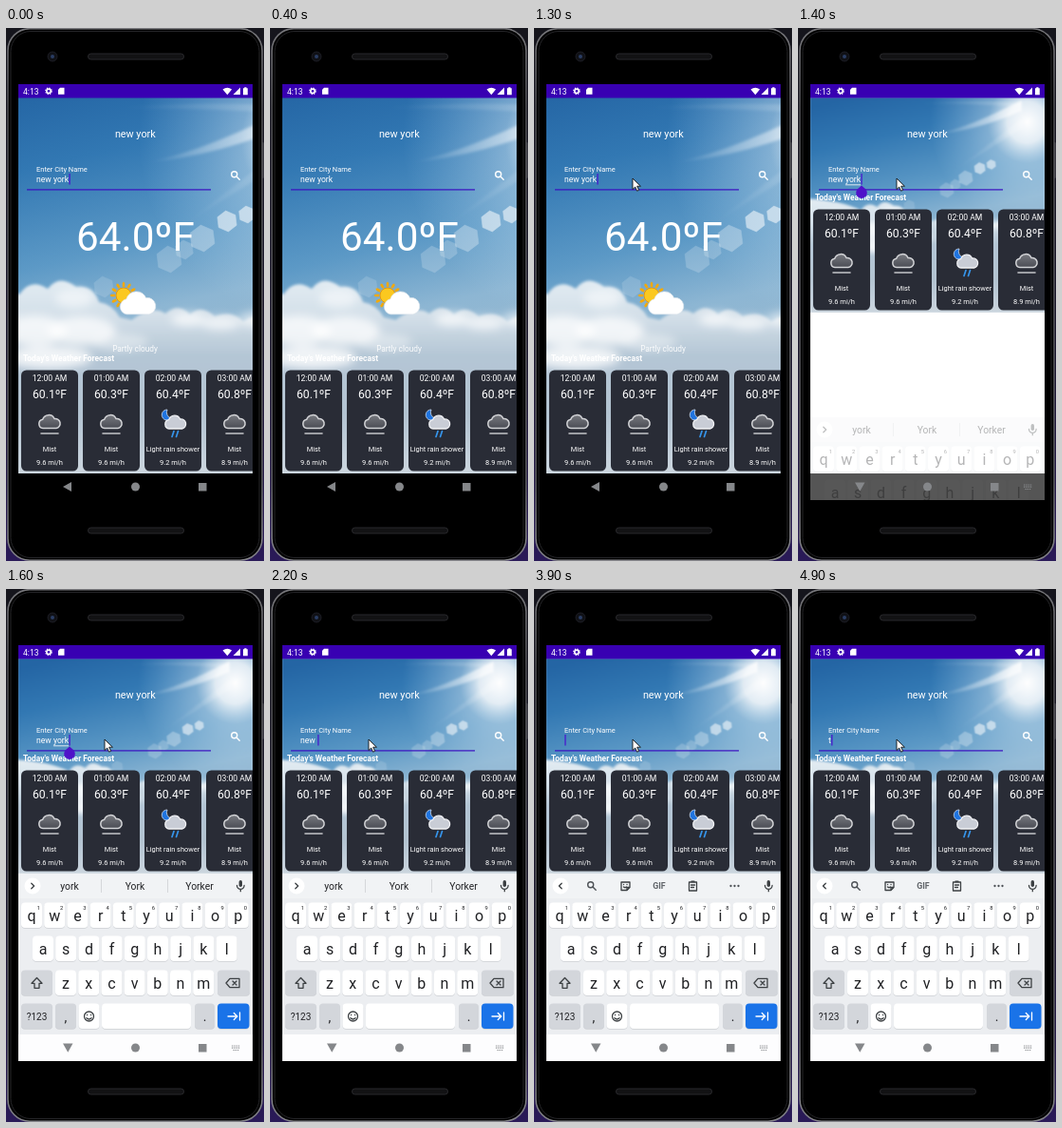
An HTML page that plays this animation: 272x560 px, repeating every 5 s.

```html
<!DOCTYPE html>
<html lang="en">
<head>
<meta charset="utf-8">
<title>Weather app</title>
<style>
html, body { margin: 0; width: 100%; height: 100%; overflow: hidden; background: #08080f; }
svg { display: block; width: 272px; height: 560px; }
text { font-family: Roboto, "Noto Sans", sans-serif; fill: #fff; white-space: pre; }
.mid { text-anchor: middle; }
.dark, .dark text { fill: #202124; }
.line { fill: none; stroke: #3c4043; stroke-width: 1.3; stroke-linecap: round; stroke-linejoin: round; }

.wide, .sky, .forecast, .open, .kb, .navbar, .words, .tools, .handle, .caret {
  animation: 5s step-end infinite;
}
.wide { animation-name: wide; }
.open { animation-name: open; }
.sky { animation-name: sky; transform-origin: 136.5px 73px; }
.forecast { animation-name: forecast; }
.kb { animation-name: kb; }
.navbar { animation-name: navbar; }
.words { animation-name: words; }
.tools { animation-name: tools; }
.handle { animation-name: handle; }
.caret { animation-name: caret; }
.pointer { animation: pointer 5s linear infinite; }

@keyframes wide { 0% { opacity: 1 } 27.9%, 100% { opacity: 0 } }
@keyframes open { 0% { opacity: 0 } 27.9%, 100% { opacity: 1 } }
@keyframes sky { 0% { transform: none } 27.9%, 100% { transform: scale(.572) } }
@keyframes forecast { 0% { transform: none } 27.9%, 100% { transform: translateY(-169px) } }
@keyframes kb {
  0% { opacity: 0; transform: translateY(176px) }
  27.9% { opacity: .33; transform: translateY(110px) }
  29.9% { opacity: .82; transform: translateY(24px) }
  31.9%, 100% { opacity: 1; transform: none }
}
@keyframes navbar { 0% { opacity: 1 } 27.9% { opacity: .66 } 29.9% { opacity: .2 } 31.9%, 100% { opacity: 0 } }
@keyframes words { 0% { opacity: 1 } 51.9%, 100% { opacity: 0 } }
@keyframes tools { 0% { opacity: 0 } 51.9%, 100% { opacity: 1 } }
@keyframes handle { 0% { opacity: 0 } 27.9% { opacity: 1 } 37.9%, 100% { opacity: 0 } }
@keyframes caret {
  0% { opacity: 1 } 7.9% { opacity: 0 } 17.9% { opacity: 1 }
  61.9% { opacity: 0 } 71.9% { opacity: 1 }
  81.9% { opacity: 0 } 91.9%, 100% { opacity: 1 }
}
@keyframes pointer {
  0%, 17% { transform: translate(62px, 562px); animation-timing-function: ease-out }
  25%, 100% { transform: translate(104px, 158px) }
}
</style>
</head>
<body>
<svg viewBox="0 0 272 560" xmlns="http://www.w3.org/2000/svg">
  <defs>
    <linearGradient id="skyFill" x1=".15" y1="0" x2=".4" y2="1">
      <stop offset="0" stop-color="#2465a4"/>
      <stop offset=".2" stop-color="#3278b3"/>
      <stop offset=".45" stop-color="#5c99c6"/>
      <stop offset=".62" stop-color="#8db6d3"/>
      <stop offset="1" stop-color="#a9bccd"/>
    </linearGradient>
    <radialGradient id="glow">
      <stop offset="0" stop-color="#fff"/>
      <stop offset=".2" stop-color="#fff" stop-opacity=".85"/>
      <stop offset=".4" stop-color="#dcecf6" stop-opacity=".42"/>
      <stop offset="1" stop-color="#b5d8f0" stop-opacity="0"/>
    </radialGradient>
    <linearGradient id="ray">
      <stop offset="0" stop-color="#fff" stop-opacity="0"/>
      <stop offset="1" stop-color="#fff" stop-opacity=".75"/>
    </linearGradient>
    <linearGradient id="bank" gradientUnits="userSpaceOnUse" x1="0" y1="262" x2="0" y2="468">
      <stop offset="0" stop-color="#e3ecf3"/>
      <stop offset=".2" stop-color="#d3dfe8"/>
      <stop offset=".4" stop-color="#b4c6d5"/>
      <stop offset=".7" stop-color="#b3c3d1"/>
      <stop offset="1" stop-color="#ccd6df"/>
    </linearGradient>
    <linearGradient id="edge" x2="0" y2="1">
      <stop offset="0" stop-color="#15151c"/>
      <stop offset=".6" stop-color="#17132a"/>
      <stop offset="1" stop-color="#2a1a58"/>
    </linearGradient>
    <linearGradient id="metal" x2="0" y2="1">
      <stop offset="0" stop-color="#77777b"/>
      <stop offset=".15" stop-color="#4c4c50"/>
      <stop offset=".85" stop-color="#5a5a5f"/>
      <stop offset="1" stop-color="#85858a"/>
    </linearGradient>
    <linearGradient id="cloudFill" x2="0" y2="1">
      <stop offset="0" stop-color="#76787e"/>
      <stop offset="1" stop-color="#4b4d55"/>
    </linearGradient>
    <filter id="soft" x="-40%" y="-40%" width="180%" height="180%"><feGaussianBlur stdDeviation="5"/></filter>
    <filter id="fine" x="-40%" y="-40%" width="180%" height="180%"><feGaussianBlur stdDeviation="1.800"/></filter>
    <clipPath id="screen"><rect x="13" y="59" width="247" height="437"/></clipPath>
    <clipPath id="skyBox"><rect x="-80" y="73" width="433" height="395"/></clipPath>
    <path id="puff" d="M5 15a4.7 4.7 0 0 1-.3-9.3A6.6 6.6 0 0 1 17 5a5 5 0 0 1 2 10z"/>
    <g id="lens" fill="none" stroke-width="1.4"><circle cx="-1.3" cy="-1.3" r="3"/><path d="M1 1 4.2 4.2" stroke-linecap="round"/></g>
  </defs>

  <!-- phone body -->
  <rect width="272" height="560" fill="url(#edge)"/>
  <rect x="269" y="120" width="2.500" height="38" rx="1" fill="#55555a"/>
  <rect x="2" y=".7" width="268" height="558.500" rx="23" fill="#000" stroke="url(#metal)" stroke-width="1.600"/>
  <rect x="5" y="3.500" width="262" height="553" rx="21" fill="none" stroke="#242427"/>
  <g fill="#121214" stroke="#29292c">
    <rect x="86.500" y="27" width="101" height="6" rx="3"/>
    <rect x="86.500" y="525" width="101" height="6" rx="3"/>
  </g>
  <circle cx="49" cy="30" r="5" fill="#101116" stroke="#1c1d23"/>
  <circle cx="49" cy="30" r="2" fill="#2a3d63"/>

  <g clip-path="url(#screen)">
    <rect x="13" y="73" width="247" height="423" fill="#fff"/>
    <g class="sky"><g clip-path="url(#skyBox)">
      <rect x="-80" y="73" width="433" height="395" fill="url(#skyFill)"/>
      <ellipse cx="320" cy="118" rx="180" ry="190" fill="url(#glow)"/>
      <g fill="url(#ray)" filter="url(#fine)">
        <path d="M150 141Q215 128 310 78V98Q225 134 150 141z"/>
        <path d="M120 84Q210 76 310 82V90Q210 84 120 84z" opacity=".3"/>
        <path d="M190 205L310 112V130z" opacity=".3"/>
      </g>
      <g fill="url(#bank)" filter="url(#fine)">
        <path d="M120 480V318Q150 288 168 300Q182 288 194 301Q206 290 220 303Q238 296 250 308Q290 288 360 300V480z"/>
        <path d="M-90 480V258Q-20 262 14 280Q26 262 44 274Q56 258 74 272Q92 270 98 288Q112 290 120 304Q145 308 160 322L260 340V480z"/>
      </g>
      <g id="clouds" fill="#fff" filter="url(#soft)"></g>
      <g id="flares" fill="#fff" stroke="#fff" stroke-opacity=".6"></g>
    </g></g>

    <!-- status bar -->
    <rect x="13" y="59" width="247" height="14.500" fill="#3800b2"/>
    <text x="18" y="69.500" font-size="8.600">4:13</text>
    <circle cx="45" cy="66.300" r="2.200" fill="none" stroke="#fff" stroke-width="1.600"/>
    <circle cx="45" cy="66.300" r="3.300" fill="none" stroke="#fff" stroke-width="1.100" stroke-dasharray="1.3 1.290"/>
    <path d="M57 62.800h4.500v7h-6.500v-5z" fill="#fff"/>
    <path d="M228.500 64.500q4.800-3.600 9.600 0l-4.800 5.700zM247 62.500v7.500h-7.500zM250 63.200h1.300v-.9h2.200v.9h1.300v7h-4.800z" fill="#fff"/>

    <!-- search header -->
    <text class="mid" x="136.300" y="115" font-size="10.800">new york</text>
    <text x="32" y="151.300" font-size="7.500">Enter City Name</text>
    <text id="query" x="32" y="162.400" font-size="8.600"></text>
    <path id="compose" stroke="#fff" stroke-width=".8"/>
    <rect x="22" y="169.300" width="194" height="1.200" fill="#3a0fc0"/>
    <rect id="caret" class="caret" y="153" width="1.200" height="11.500" fill="#4a10d0"/>
    <use href="#lens" x="242" y="155" stroke="#fff"/>

    <!-- current conditions -->
    <g class="wide">
      <text class="mid" x="136.500" y="234" font-size="42.200">64.0ºF</text>
      <g id="sun" fill="#f2a90c"></g>
      <use href="#puff" transform="translate(119 275) scale(1.68 1.72)" fill="#fff" stroke="#dfe6ec" stroke-width=".4"/>
      <text class="mid" x="136" y="340" font-size="8.300" opacity=".92">Partly cloudy</text>
    </g>

    <g class="forecast">
      <text x="18" y="350" font-size="8.400" font-weight="700">Today's Weather Forecast</text>
      <g id="cards"></g>
    </g>

    <g class="handle">
      <path d="M67 165.500l4.300 3.800a5.800 5.800 0 1 1-8.600 0z" fill="#4f12c9"/>
    </g>

    <!-- keyboard -->
    <g class="kb">
      <rect x="13" y="299" width="247" height="200" fill="#eceef1"/>
      <rect x="13" y="299" width="247" height="26" fill="#f1f3f5"/>
      <g id="keys"></g>
      <circle cx="28" cy="312" r="8.500" fill="#fff"/>
      <g class="words">
        <path class="line" d="M26.800 309.200l2.800 2.800-2.800 2.800"/>
        <path d="M100.500 305v14M170.500 305v14" stroke="#d5d7da"/>
        <g class="mid dark" font-size="10.300">
          <text x="67" y="315.500">york</text><text x="136" y="315.500">York</text><text x="204" y="315.500">Yorker</text>
        </g>
      </g>
      <g class="tools">
        <path class="line" d="M29.200 309.200l-2.800 2.800 2.800 2.800"/>
        <use href="#lens" x="61" y="312" stroke="#4d5156"/>
        <path class="line" d="M92 308h9v5.500l-3 3h-6zM98 316v-2.500h3M94.500 310.500h.1M98 310.500h.1M94.500 313q1.500 1.300 3 0"/>
        <text class="mid" x="132" y="315.300" font-size="8.800" font-weight="700" style="fill:#5f6368">GIF</text>
        <path class="line" d="M163.500 308h8v9h-8zM166 307.200h3M165.500 311h4M165.500 313.500h3"/>
        <g fill="#4d5156"><circle cx="207.500" cy="312" r="1.150"/><circle cx="211.500" cy="312" r="1.150"/><circle cx="215.500" cy="312" r="1.150"/></g>
      </g>
      <rect x="245.600" y="306" width="3.400" height="7" rx="1.700" fill="#3c4043"/>
      <path class="line" d="M243.500 311.500a3.800 3.800 0 0 0 7.600 0M247.300 315.500v2.200"/>
      <rect x="13" y="468" width="247" height="31" fill="#fdfdfe"/>
    </g>

    <!-- navigation -->
    <rect class="navbar" x="13" y="468" width="247" height="28" fill="#000"/>
    <g fill="#85878a">
      <path class="wide" d="M60 482l9-5v10z"/>
      <path class="open" d="M60 477.500h10.500l-5.250 9.300z"/>
      <circle cx="136.500" cy="482" r="4.500"/>
      <rect x="203" y="478" width="8.500" height="8.500"/>
    </g>
    <g class="open" stroke="#8b8d90" stroke-width="1.200" stroke-dasharray="1.300 .9">
      <path d="M238 480h9M238 482.200h9M239.500 484.500h6"/>
    </g>
  </g>

  <g class="pointer">
    <path d="M0 0v11.500l2.700-2.500 1.900 4.200 2-.9-1.900-4.100h3.700z" fill="#fff" stroke="#111" stroke-width=".9"/>
  </g>
</svg>

<script>
const $ = id => document.getElementById(id);
const rect = (x, y, w, h, r, fill) =>
  `<rect x="${x}" y="${y}" width="${w}" height="${h}" rx="${r}" fill="${fill}"/>`;
const label = (s, x, y, size, cls = 'mid') =>
  `<text class="${cls}" x="${x}" y="${y}" font-size="${size}">${s}</text>`;

// Sky
const cloud = (x, y, rx, ry, o) =>
  `<ellipse cx="${x}" cy="${y}" rx="${rx}" ry="${ry}" opacity="${o}"/>`;
$('clouds').innerHTML = [
  [72, 284, 20, 10, .5], [30, 318, 34, 16, .75], [80, 318, 36, 15, .75],
  [45, 346, 46, 12, .8], [192, 306, 18, 7, .7], [226, 310, 20, 7, .65],
  [285, 306, 40, 10, .6], [-30, 300, 40, 20, .4], [120, 330, 30, 9, .4]
].map(c => cloud(...c)).join('');
const hexagon = (x, y, r, o) => {
  const pts = [...Array(6).keys()].map(i => {
    const a = i * Math.PI / 3 + .4;
    return (x + r * Math.cos(a)).toFixed(1) + ',' + (y + r * Math.sin(a)).toFixed(1);
  });
  return `<polygon points="${pts.join(' ')}" opacity="${o}"/>`;
};
$('flares').innerHTML = hexagon(172, 243, 14, .2) + hexagon(207, 221, 14, .3)
  + hexagon(188, 233, 10, .2) + hexagon(233, 203, 11, .55) + hexagon(254, 196, 9, .55)
  + hexagon(103, 272, 11, .14);

$('sun').innerHTML = [...Array(12).keys()].map(i =>
  `<path d="M122.700 268l1.300-1.500 1.300 1.500v4h-2.600z" transform="rotate(${i * 30} 124 281)"/>`).join('')
  + '<circle cx="124" cy="281" r="8" fill="#fbc81f" stroke="#e8980a"/>';

// Hourly cards
const mist = x =>
  `<use href="#puff" transform="translate(${x - 12} 405.500)" fill="url(#cloudFill)" stroke="#d2d3d6" stroke-width="1.500"/>
  <path d="M${x - 9} 426h18" stroke="#c4c5c9" stroke-width="1.600" stroke-linecap="round"/>`;
const shower = x =>
  `<path d="M${x - 6} 401a5.500 5.500 0 1 0 4 9 6.500 6.500 0 0 1-4-9z" fill="#1f74e0" stroke="#e4eefb" stroke-width=".7"/>
  <use href="#puff" transform="translate(${x - 9} 406) scale(.98 1)" fill="#c9cdd6" stroke="#f1f2f5" stroke-width="1.300"/>
  <path d="M${x + 1} 423.500l-2 6M${x + 5.5} 423.500l-2 6" stroke="#3595ec" stroke-width="1.700" stroke-linecap="round"/>`;
$('cards').innerHTML = [
  ['12:00 AM', '60.1', mist, 'Mist', '9.6'],
  ['01:00 AM', '60.3', mist, 'Mist', '9.6'],
  ['02:00 AM', '60.4', shower, 'Light rain shower', '9.2'],
  ['03:00 AM', '60.8', mist, 'Mist', '8.9']
].map(([hour, temp, icon, sky, wind], i) => {
  const x = 16 + 65 * i, c = x + 30;
  return rect(x, 359.5, 60, 106, 5.5, '#292c36') + label(hour, c, 371.3, 8.6)
    + label(temp + 'ºF', c, 388.5, 12.2) + icon(c) + label(sky, c, 445, 7.4)
    + label(wind + ' mi/h', c, 459, 7.5);
}).join('');

// Keyboard
const grey = '#d3d6db', pitch = 24.2;
const key = (x, y, w, fill = '#fff') =>
  rect(x, y + 1.3, w, 26.5, 4, '#cdd0d4') + rect(x, y + .5, w, 26.5, 4, fill);
const row = (letters, x0, y, digits) => [...letters].map((ch, i) => {
  const x = x0 + i * pitch;
  return key(x - 11, y - 14, 22) + label(ch, x, y + 5.5, 16, 'mid dark')
    + (digits ? label((i + 1) % 10, x + 7.5, y - 6.5, 5.8, 'mid dark') : '');
}).join('');
$('keys').innerHTML = row('qwertyuiop', 27, 343, true) + row('asdfghjkl', 39, 378)
  + row('zxcvbnm', 63, 414)
  + key(16, 400, 33, grey) + key(223, 400, 34, grey)
  + '<path class="line" d="M32.500 408.500l-5.500 5.800h3v5h5v-5h3z"/>'
  + '<path class="line" d="M232 414l4-4.700h10v9.400h-10zM239 412l4 4M243 412l-4 4"/>'
  + key(16, 435, 33, grey) + label('?123', 32.5, 452.8, 10, 'mid dark')
  + key(52, 435, 22, grey) + label(',', 63, 455, 14, 'mid dark')
  + key(76.5, 435, 22)
  + '<circle class="line" cx="87.500" cy="449" r="5"/><path class="line" d="M85.500 447.500h.1M89.500 447.500h.1M84.900 450.700q2.600 2.600 5.200 0"/>'
  + key(101, 435, 94) + key(199, 435, 21, grey) + label('.', 209.5, 454, 14, 'mid dark')
  + key(223, 435, 33.5, '#1a73e8')
  + '<path class="line" style="stroke:#fff" d="M234 449h9.500M240.300 445.500l3.500 3.500-3.500 3.500M246.500 445v8"/>';

// Text field: hold, erase one letter per 100 ms, then type a letter
const loop = 5000, shown = 1400, erase = 1900, retype = 4800, phrase = 'new york';
const query = $('query');
const typed = t => t >= retype ? 't'
  : phrase.slice(0, Math.max(0, phrase.length - Math.max(0, Math.floor((t - erase) / 100) + 1)));
const width = s => {
  query.textContent = s;
  return s ? query.getComputedTextLength() : 0;
};
let start;
function draw(now) {
  start ??= now;
  const t = (now - start + 5) % loop;
  const s = typed(t);
  const from = 32 + width(s.slice(0, s.lastIndexOf(' ') + 1));
  const end = 32 + width(s);
  $('caret').setAttribute('x', end + .4);
  $('compose').setAttribute('d', s && t >= shown && t < retype ? `M${from} 164.800H${end}` : '');
  requestAnimationFrame(draw);
}
requestAnimationFrame(draw);
</script>
</body>
</html>
```
